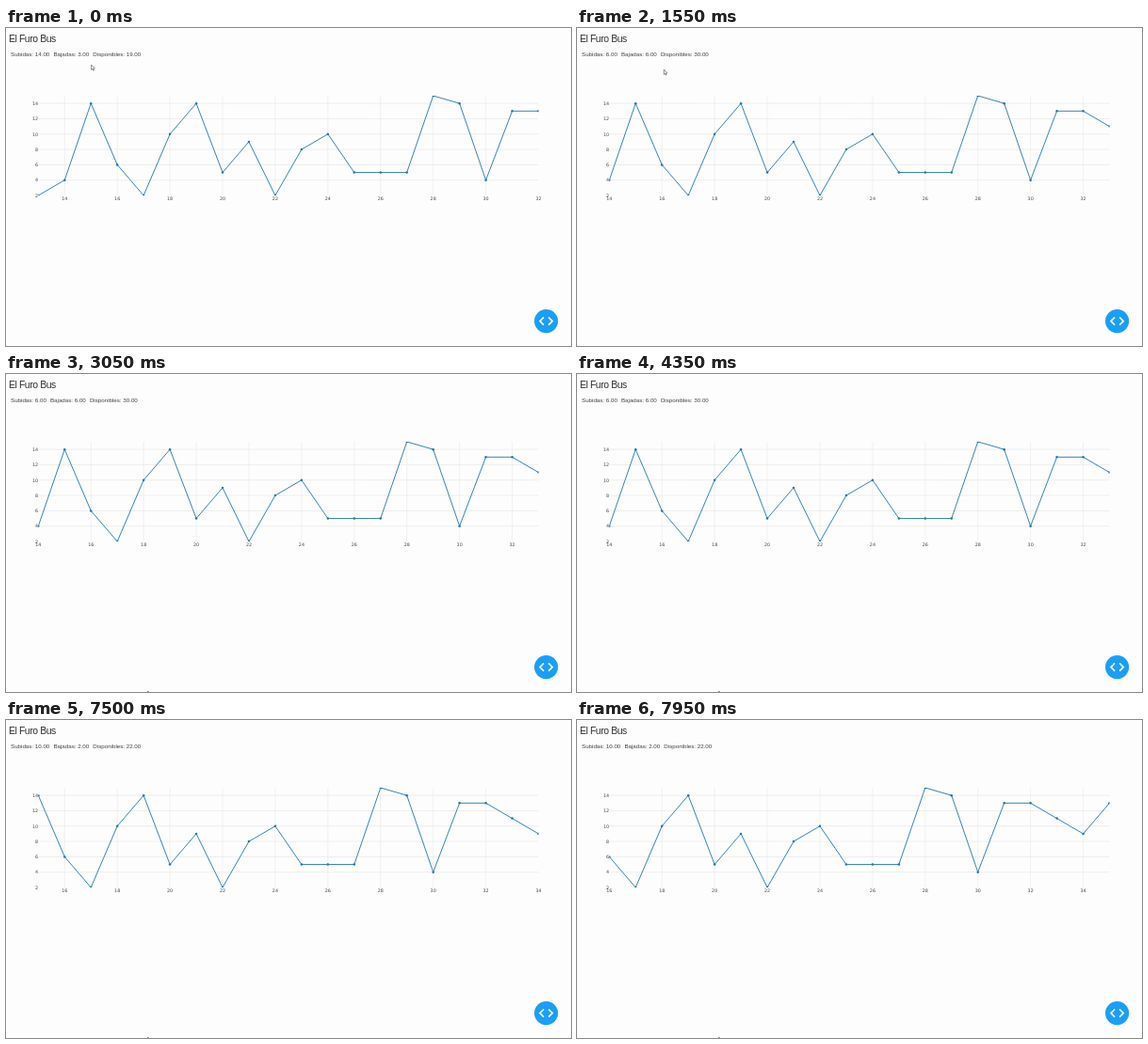
Write an HTML page with a canvas that moves like this. It is 600 by 338 pixels and loops after 8000 ms.

```html
<!DOCTYPE html>
<html lang="es">
<head>
<meta charset="utf-8">
<title>Bus</title>
<style>
html, body { margin: 0; width: 100%; height: 100%; overflow: hidden; background: #fdfdfd; }
canvas { display: block; width: 600px; height: 338px; }
</style>
</head>
<body>
<canvas id="stage"></canvas>
<script>
const canvas = document.getElementById('stage');
const ctx = canvas.getContext('2d');
const scale = window.devicePixelRatio || 1;
canvas.width = 600 * scale;
canvas.height = 338 * scale;

const LOOP = 8000, TICK = 50, SPAN = 19, FIRST = 13;
const plot = { left: 34.3, right: 565.5, top: 72, bottom: 178 };
const series = [2, 4, 14, 6, 2, 10, 14, 5, 9, 2, 8, 10, 5, 5, 5, 15, 14, 4, 13, 13, 11, 9, 13];
const readings = [
  { at: 0, values: [14, 3, 19] },
  { at: 1550, values: [6, 6, 30] },
  { at: 4550, values: [2, 13, 41] },
  { at: 7500, values: [10, 2, 22] }
];
const shifts = [1550, 4600, 7550];

const clamp = v => Math.max(0, Math.min(1, v));
const mix = (a, b, k) => a + (b - a) * k;
const yOf = v => mix(plot.bottom, plot.top, (v - 2) / 13);

function text(str, x, y, font, color, align = 'left', spacing = '0px') {
  ctx.font = font;
  ctx.fillStyle = color;
  ctx.textAlign = align;
  ctx.letterSpacing = spacing;
  ctx.fillText(str, x, y);
}

function path(points, color, width) {
  ctx.beginPath();
  points.forEach(([x, y]) => ctx.lineTo(x, y));
  ctx.strokeStyle = color;
  ctx.lineWidth = width;
  ctx.stroke();
}

function drawHeader(t) {
  text('El Furo Bus', 3, 14.8, '10.4px "Liberation Sans", Arial, sans-serif', '#303030', 'left', '-0.4px');
  const { values } = readings.filter(r => r.at <= t).pop();
  let x = 5;
  ['Subidas', 'Bajadas', 'Disponibles'].forEach((label, i) => {
    const str = `${label}: ${values[i].toFixed(2)}`;
    text(str, x, 30.1, '6.2px "Liberation Sans", Arial, sans-serif', '#404040');
    x += ctx.measureText(str).width + 4.1;
  });
}

function drawChart(t) {
  const start = FIRST + shifts.filter(s => s <= t).length;
  const xOf = n => mix(plot.left, plot.right, (n - start) / SPAN);
  const labelFont = '4.8px "DejaVu Sans", Verdana, sans-serif';
  const xTicks = [], yTicks = [2, 4, 6, 8, 10, 12, 14];
  for (let n = start + start % 2; n <= start + SPAN; n += 2) xTicks.push(n);

  // Grid lines on the plot edges stay hidden
  xTicks.filter(n => n > start && n < start + SPAN).forEach(n =>
    path([[xOf(n), plot.top], [xOf(n), plot.bottom]], '#eee', 0.8));
  yTicks.slice(1).forEach(v =>
    path([[plot.left, yOf(v)], [plot.right, yOf(v)]], '#eaeaea', 0.8));

  ctx.save();
  ctx.beginPath();
  ctx.rect(plot.left, plot.top, plot.right - plot.left, plot.bottom - plot.top);
  ctx.clip();
  const points = series.map((v, i) => [xOf(FIRST + i), yOf(v)])
    .slice(start - FIRST, start - FIRST + SPAN + 1);
  path(points, '#1f77b4', 0.9);
  ctx.fillStyle = '#1f77b4';
  points.forEach(([x, y]) => {
    ctx.beginPath();
    ctx.arc(x, y, 1.25, 0, Math.PI * 2);
    ctx.fill();
  });
  ctx.restore();

  xTicks.forEach(n => text(n, xOf(n), 182.8, labelFont, '#444', 'center'));
  yTicks.forEach(v => text(v, 34, yOf(v) + 1.75, labelFont, '#444', 'right'));
}

function drawButton() {
  ctx.fillStyle = '#1a9ff8';
  ctx.beginPath();
  ctx.arc(573.6, 311.6, 12.6, 0, Math.PI * 2);
  ctx.fill();
  for (const side of [-1, 1]) {
    const x = 573.6 + side * 2.6;
    path([[x, 307.5], [x + side * 4, 311.6], [x, 315.7]], '#fff', 1.7);
  }
}

function drawCursor(t) {
  const nudge = clamp((t - 200) / 250);
  const exit = clamp((t - 1550) / 250);
  const leave = exit * exit * (3 - 2 * exit);
  const x = mix(mix(90.6, 92.3, nudge), 150.6, leave);
  const y = mix(mix(39.2, 44.1, nudge), 336.9, leave);
  ctx.beginPath();
  [[0, 0], [0, 5.2], [1.2, 4.2], [2, 6], [2.8, 5.6], [2, 3.9], [3.6, 3.7]]
    .forEach(([dx, dy]) => ctx.lineTo(x + dx, y + dy));
  ctx.closePath();
  ctx.fillStyle = '#fff';
  ctx.fill();
  ctx.strokeStyle = '#444';
  ctx.lineWidth = 0.6;
  ctx.stroke();
}

function draw() {
  const t = Math.floor((performance.now() % LOOP) / TICK) * TICK;
  ctx.setTransform(scale, 0, 0, scale, 0, 0);
  ctx.fillStyle = '#fdfdfd';
  ctx.fillRect(0, 0, 600, 338);
  drawHeader(t);
  drawChart(t);
  drawButton();
  drawCursor(t);
  requestAnimationFrame(draw);
}
draw();
</script>
</body>
</html>
```
